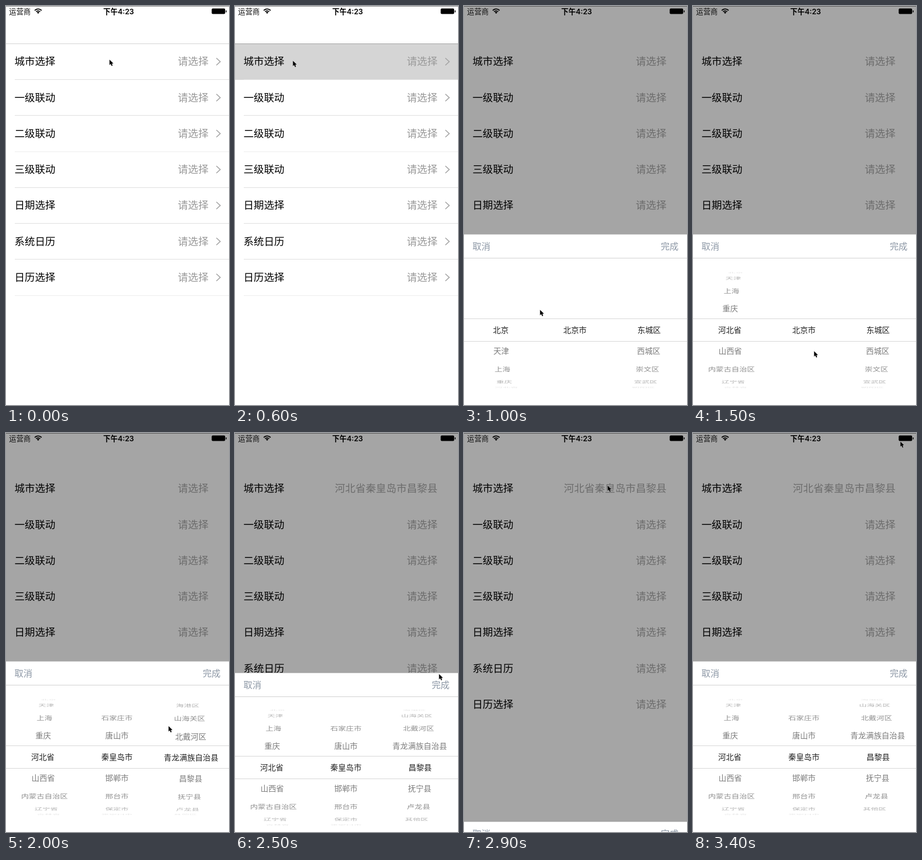
Write an HTML page with a canvas that moves like this. It is 406 px wide and 724 px high and loops after 3500 ms.

```html
<!DOCTYPE html>
<html lang="zh-CN">
<head>
<meta charset="utf-8">
<title>城市选择</title>
<style>
html, body { margin: 0; width: 100%; height: 100%; overflow: hidden; background: #fff; }
canvas { display: block; width: 406px; height: 724px; }
</style>
</head>
<body>
<canvas id="stage" width="406" height="724"></canvas>
<script>
const ctx = document.getElementById('stage').getContext('2d');
const W = 406, H = 724, LOOP = 3500, STEP = 100;
const SHEET_HEIGHT = 310;
const CJK = '"Noto Sans CJK SC", "Noto Sans CJK", sans-serif';

const split = s => s.split(' ');
const rows = split('城市选择 一级联动 二级联动 三级联动 日期选择 系统日历 日历选择');
const provinces = split('北京 天津 上海 重庆 河北省 山西省 内蒙古自治区 辽宁省 吉林省 黑龙江省 江苏省');
const hebei = split('石家庄市 唐山市 秦皇岛市 邯郸市 邢台市 保定市 张家口市 承德市 沧州市');
const beijing = split('东城区 西城区 崇文区 宣武区 朝阳区 丰台区 石景山区');
const shijiazhuang = split('长安区 桥东区 桥西区 新华区 井陉矿区 裕华区 井陉县');
const qinhuangdao = split('海港区 山海关区 北戴河区 青龙满族自治县 昌黎县 抚宁县 卢龙县 其他区');

// Places the pointer passes through
const stops = [
  { time: 0, x: 188, y: 97 },
  { time: 600, x: 105, y: 99 },
  { time: 1000, x: 138, y: 551 },
  { time: 1500, x: 220, y: 626 },
  { time: 2500, x: 371, y: 437 },
  { time: 2900, x: 261, y: 95 },
  { time: 3400, x: 377, y: 15 }
];

function ease(t, start, end) {
  const p = Math.min(1, Math.max(0, (t - start) / (end - start)));
  return p * p * (3 - 2 * p);
}

const slide = (t, start) => ease(t, start, start + 100);

// Opens, closes and opens again
const sheetOffset = t => SHEET_HEIGHT * (1 - slide(t, 618) + slide(t, 2484) - slide(t, 2885));

function pointerAt(t) {
  const pos = { ...stops[0] };
  for (let i = 1; i < stops.length; i++) {
    const a = stops[i - 1], b = stops[i], p = ease(t, a.time, b.time);
    pos.x += (b.x - a.x) * p;
    pos.y += (b.y - a.y) * p;
  }
  return pos;
}

function rect(x, y, w, h, color) {
  ctx.fillStyle = color;
  ctx.fillRect(x, y, w, h);
}

function polyline(x, y, points) {
  ctx.beginPath();
  points.forEach(([dx, dy]) => ctx.lineTo(x + dx, y + dy));
}

// y is the visual centre of the characters
function text(s, x, y, size, color, align = 'left', weight = 400, family = CJK) {
  ctx.font = `${weight} ${size}px ${family}`;
  ctx.textAlign = align;
  ctx.fillStyle = color;
  ctx.fillText(s, x, y + size * 0.345);
}

function statusBar(dim) {
  rect(0, 0, W, 1, dim ? '#555' : '#808080');
  text('运营商', 5.5, 10, 13.2, '#111');
  text('下午4:23', 205, 10, 13.2, '#000', 'center', 600, 'Inter, ' + CJK);

  const wedge = r => ctx.arc(58.5, 14, r, -Math.PI * 0.76, -Math.PI * 0.24);
  ctx.strokeStyle = ctx.fillStyle = '#000';
  ctx.lineWidth = 1.8;
  for (const r of [5.2, 8.6]) {
    ctx.beginPath();
    wedge(r);
    ctx.stroke();
  }
  ctx.beginPath();
  ctx.moveTo(58.5, 14);
  wedge(3.2);
  ctx.fill();

  ctx.beginPath();
  ctx.roundRect(374.5, 4.5, 24.5, 10, 2);
  ctx.fill();
  rect(400, 8, 1.5, 3.5, '#000');
}

function list(dim, pressed, chosen) {
  rect(0, 0, W, H, dim ? '#a5a5a5' : '#fff');
  if (!dim) {
    if (pressed) rect(0, 68, W, 66, '#d5d5d5');
    rect(0, 68, W, 1, pressed ? '#a4a4a4' : '#d2d2d2');
  }
  rows.forEach((label, i) => {
    const y = 101 + i * 65.25;
    const value = i === 0 && chosen ? '河北省秦皇岛市昌黎县' : '请选择';
    text(label, 15.5, y, 18.6, '#000');
    text(value, 368.7, y, 18.7, dim ? '#6c6c6c' : '#999', 'right', dim ? 300 : 400);
    if (dim) return;
    ctx.strokeStyle = '#a4a4a4';
    ctx.lineWidth = 1.7;
    polyline(383, y, [[0, -6.5], [7, 0], [0, 6.5]]);
    ctx.stroke();
    const faint = i % 4 === 2;
    rect(16, Math.round(y + 32), W - 16, 1, faint ? '#ececec' : '#dedede');
  });
}

// Items sit on the face of a cylinder
function wheel(items, index, column, centreY) {
  const angle = 21.5 * Math.PI / 180, radius = 104;
  items.forEach((item, i) => {
    const k = i - index, d = Math.abs(k);
    if (d > 4.2) return;
    const depth = Math.cos(k * angle);
    const grey = d < 0.5 ? 34 : Math.round(115 + 7 * d * d);
    ctx.save();
    ctx.translate(202 + column * (135 - 11 * (1 - depth)), centreY + radius * Math.sin(k * angle));
    ctx.scale(1, Math.max(depth, 0.16));
    text(item, 0, 0, 14.2, `rgb(${grey},${grey},${grey})`, 'center');
    ctx.restore();
  });
}

function sheet(t, offset) {
  const top = Math.round(414 + offset), shift = Math.round(offset * 0.87);
  rect(0, top, W, H - top, '#fff');
  for (const y of [0, 43]) rect(0, top + y, W, 1, '#d0d0d0');
  text('取消', 15.5, top + 22, 16.2, '#8c97a5', 'left', 500);
  text('完成', 390.5, top + 22, 16.2, '#8c97a5', 'right', 500);

  const centre = 588 + shift;
  const cities = t >= 1600 ? hebei : ['北京市'];
  const districts = t >= 1800 ? qinhuangdao : t >= 1600 ? shijiazhuang : beijing;
  wheel(provinces, 4 * ease(t, 1000, 1400), -1, centre);
  wheel(cities, 2 * ease(t, 1500, 1700), 0, centre);
  wheel(districts, 4 * ease(t, 1800, 2100), 1, centre);
  for (const y of [567, 608]) rect(0, y + shift, W, 1, '#d6d6d6');
}

function pointer({ x, y }) {
  polyline(x + 0.5, y + 0.5, [[0, 0], [0, 9.5], [2.2, 7.6], [3.8, 11.2], [5.5, 10.5], [4.1, 7], [6.9, 6.8]]);
  ctx.closePath();
  ctx.lineWidth = 1;
  ctx.strokeStyle = '#ddd';
  ctx.stroke();
  ctx.fillStyle = '#000';
  ctx.fill();
}

function draw(t) {
  const offset = sheetOffset(t);
  const open = offset < SHEET_HEIGHT - 1;
  const pressed = t === 600 || t === 2800;
  list(open, pressed, t >= 2500);
  statusBar(open);
  if (open) sheet(t, offset);
  pointer(pointerAt(t));
}

function tick() {
  const t = performance.now() % LOOP;
  draw(Math.floor(t / STEP) * STEP);
  requestAnimationFrame(tick);
}
tick();
</script>
</body>
</html>
```
